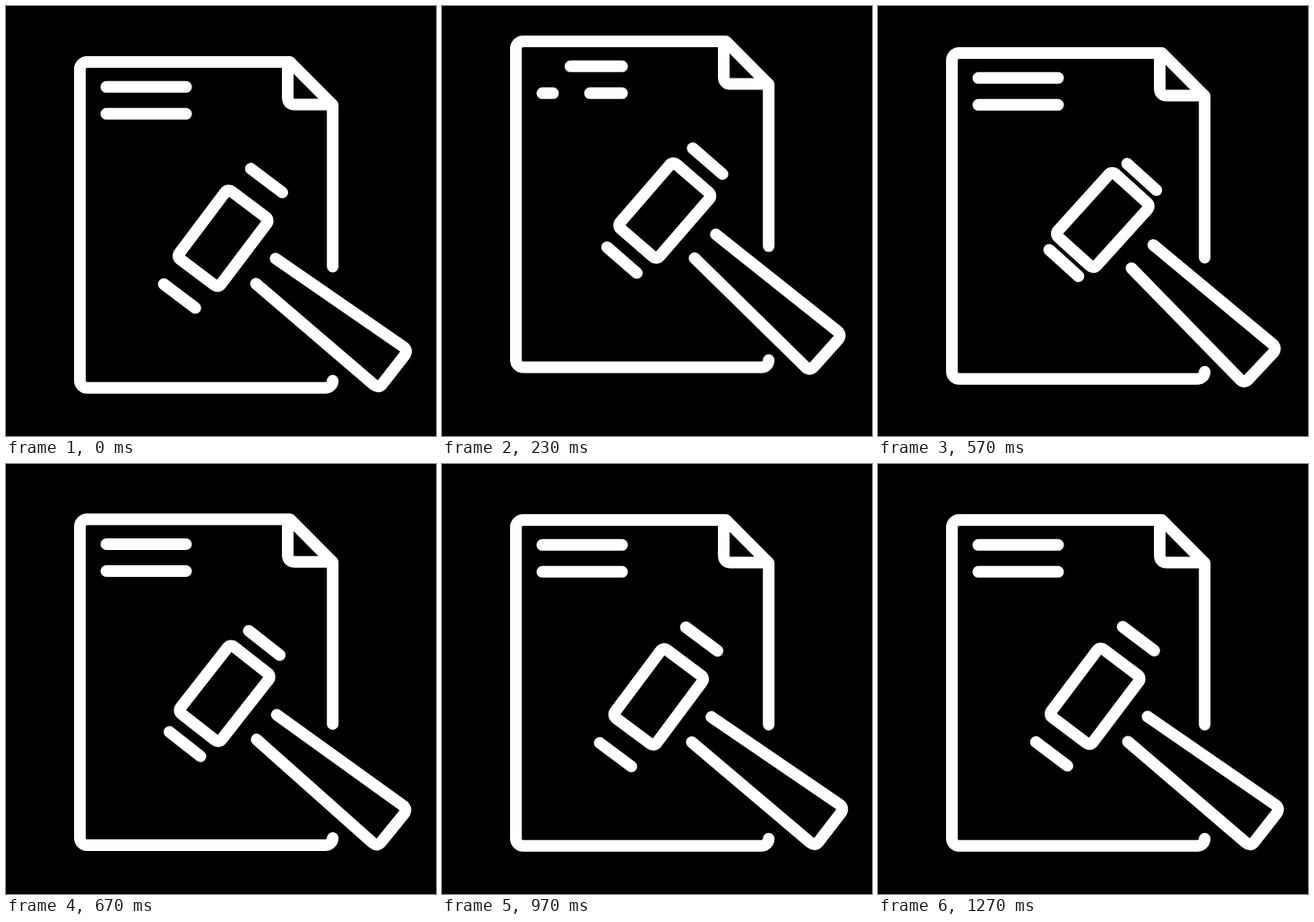
An HTML page for the animation above (1530 ms loop, 480 px wide and 480 px high).

```html
<!DOCTYPE html>
<html lang="en">
<head>
<meta charset="utf-8">
<title>Gavel and document</title>
<style>
  html, body { margin: 0; width: 100%; height: 100%; overflow: hidden; background: #000; }
  svg { display: block; width: 100%; height: 100%; }
</style>
</head>
<body>
<svg viewBox="0 0 480 480" fill="none" stroke="#fff" stroke-width="13" stroke-linecap="round" stroke-linejoin="round">
  <g id="scene">
    <path d="M364.700 291V110.500L317 62.500H90.500A8 8 0 0 0 82.500 70.500V418.300A8 8 0 0 0 90.500 426.300H357A8 8 0 0 0 364.700 418.300"/>
    <path d="M314.500 63V102Q314.500 110 322.500 110H364"/>
    <path id="line1"/>
    <path id="line2"/>
    <g id="gavel">
      <path d="M301 282L443 380Q449 384 445 390L420 422Q416 427 411 423L279 310"/>
      <g transform="translate(242.3 259.3) rotate(37)">
        <rect x="-29" y="-47.500" width="58" height="95" rx="5"/>
        <path id="topMark" d="M-22 0H22"/>
        <path id="lowMark" d="M-22 0H22"/>
      </g>
    </g>
  </g>
</svg>
<script>
const LOOP = 1530;
const FPS = 30;
const LEFT = 112, RIGHT = 201;
const el = id => document.getElementById(id);

// Tracks are [time in ms, value] keys, eased in and out between keys.
const tracks = {
  lift:  [[0, 0], [267, -24], [400, -24], [700, 0]],
  angle: [[0, 0], [400, 6.2], [500, 6.2], [833, -4], [1067, 2.1], [1267, 0]],
  gap:   [[67, 80.7], [433, 63], [500, 63], [833, 80.5]]
};

// Each text line is wiped from the left, then redrawn from the left.
const lines = [
  { id: "line1", y: 90.3, wipe: [100, 433], draw: [234, 570] },
  { id: "line2", y: 120.3, wipe: [45, 378], draw: [145, 530] }
];

const ease = p => p * p * (3 - 2 * p);
const progress = (t, from, to) => ease(Math.min(1, Math.max(0, (t - from) / (to - from))));

function valueAt(keys, t) {
  let value = keys[0][1];
  for (let i = 1; i < keys.length; i++) {
    const [from, a] = keys[i - 1], [to, b] = keys[i];
    if (t >= from) value = a + (b - a) * progress(t, from, to);
  }
  return value;
}

function drawLine({ id, y, wipe, draw }, t) {
  const at = p => LEFT + (RIGHT - LEFT) * p;
  const wiped = progress(t, ...wipe);
  const drawn = progress(t, ...draw);
  let d = "";
  if (wiped < 0.999) d += `M${at(wiped)} ${y}H${RIGHT}`;
  if (drawn > 0) d += `M${LEFT} ${y}H${at(drawn)}`;
  el(id).setAttribute("d", d);
}

function render(t) {
  const gap = valueAt(tracks.gap, t);
  el("scene").setAttribute("transform", `translate(0 ${valueAt(tracks.lift, t)})`);
  el("gavel").setAttribute("transform", `rotate(${valueAt(tracks.angle, t)} 363 350)`);
  el("topMark").setAttribute("transform", `translate(0 ${-gap})`);
  el("lowMark").setAttribute("transform", `translate(0 ${gap})`);
  lines.forEach(line => drawLine(line, t));
}

// Hold each pose for one 30 fps step, with step starts rounded to 10 ms.
function stepTime(t) {
  const tick = Math.floor(t / 10) * 10 + 3.4;
  return Math.floor(tick * FPS / 1000) * 1000 / FPS;
}

const begin = performance.now();
function loop() {
  render(stepTime((performance.now() - begin) % LOOP));
  requestAnimationFrame(loop);
}
loop();
</script>
</body>
</html>
```
